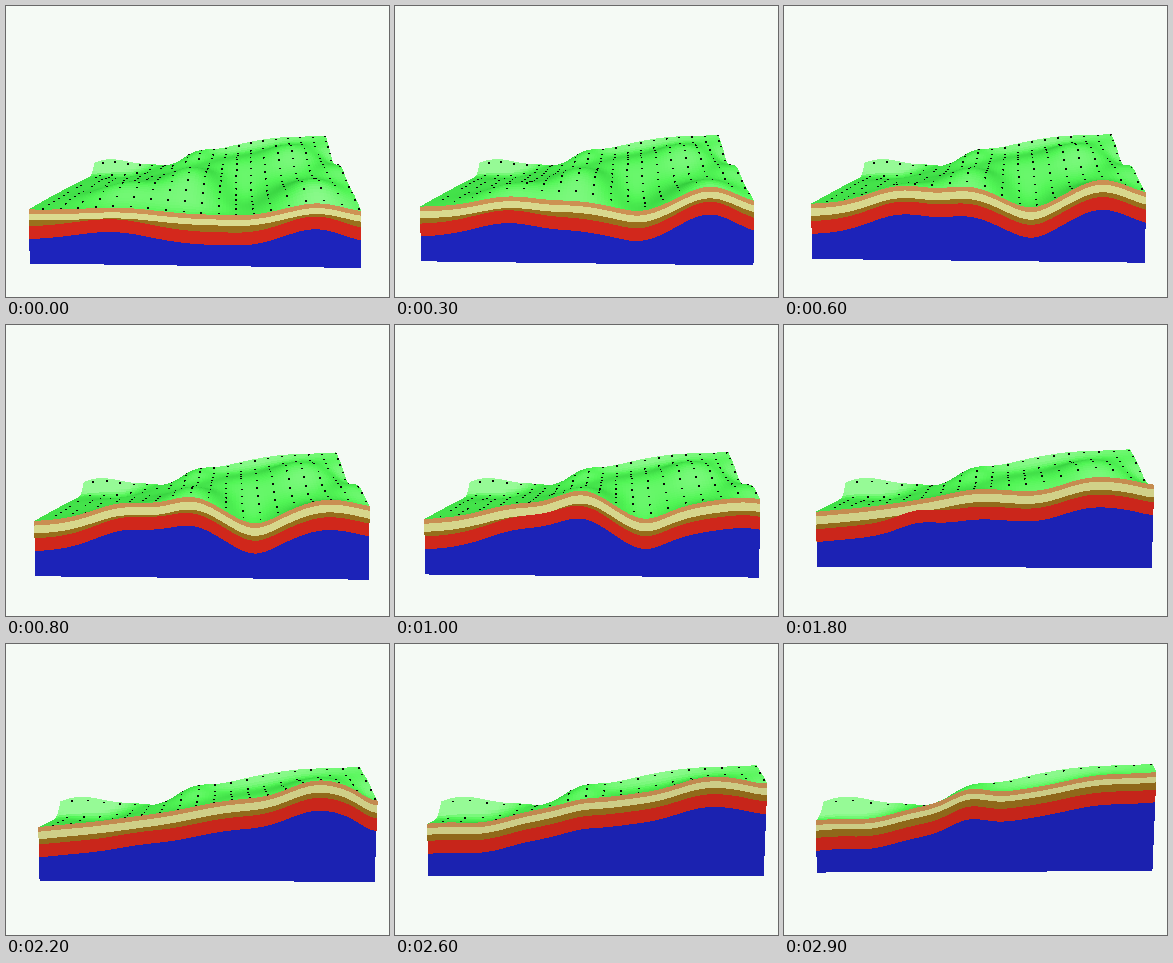
A matplotlib script for the animation above (3.2 s loop, 383x291 px).

```python
import numpy as np
import matplotlib.pyplot as plt
from matplotlib.animation import FuncAnimation
from matplotlib.collections import PolyCollection

W, H = 383, 291
FRAMES, INTERVAL = 32, 100
LAST = 29            # the cut stops here and holds
BACK = 31.65         # depth of the rear edge, in steps of the cut
STEP = 0.0139        # perspective distance per step
DEPTH = 10.5         # pixels of depth per step
WIDTH = 335
HORIZON = 155
BACK_X = 204

# Hills and hollows: height, u, v, spread in u, spread in v
HILLS = [
    (16, 0.27, 6.5, 0.13, 5),
    (20, 0.47, 10.5, 0.10, 6.5),
    (5, 0.36, 15, 0.15, 5),
    (-10, 0.66, 8.5, 0.08, 7),
    (-4, 0.50, 0, 0.13, 3),
    (20, 0.87, 4.3, 0.11, 5),
    (9, 0.97, 13, 0.08, 4),
    (17, 0.82, 22, 0.12, 6),
    (6, 0.58, 22, 0.13, 5),
    (-11, 1.00, 22, 0.06, 4),
    (-7, 0.17, 27.5, 0.10, 3.5),
    (9, 0.45, 29.5, 0.07, 3.5),
    (24, 0.05, 32.5, 0.14, 1.7),
    (-6, 0.33, 32, 0.06, 2),
    (14, 0.70, 33, 0.25, 2.5),
]
# Places where the upper layers thin out
PINCHES = [
    (6, 0.23, 0, 0.16, 4.5),
    (4.5, 0.85, 0, 0.12, 4),
    (5, 0.33, 10, 0.15, 3),
    (7, 0.30, 18, 0.08, 3),
]

PAPER = "#f5faf5"
INK = 0.03
LAYERS = np.array([[206, 146, 84], [219, 219, 143], [154, 112, 28],
                   [212, 40, 28], [29, 36, 188]]) / 255
SHADE_AT = [0.0, 0.32, 0.6, 0.85]
SHADES = np.array([[12, 100, 28], [48, 200, 58], [82, 246, 86], [150, 250, 150]]) / 255
LIGHT = np.array([0.05, 0.4, 0.92])

U = np.linspace(0, 1, 97)
DOT_U = 0.038 + 0.0533 * np.arange(19)
DOT_V = 31.4 - 2.2 * np.arange(15)


def mounds(u, v, items):
    return sum(a * np.exp(-((u - cu) / su)**2 - ((v - cv) / sv)**2)
               for a, cu, cv, su, sv in items)


def height(u, v):
    """Ground level above the horizon plane: a twisted slope with hills."""
    return -49 + 0.93 * v + u * (1.8 * v - 4) + mounds(u, v, HILLS)


def curve(n, start, slope, bend):
    return start + slope * n + bend * n * n


def sides(cut):
    return curve(cut, 23, 0.85, -0.0185), curve(cut, 355, 1.2, -0.0212)


def project(u, v, cut):
    left, right = sides(cut)
    scale = 1 + STEP * (v - cut)
    mid = (left + right) / 2
    mid = mid + (BACK_X - mid) * (v - cut) / (BACK - cut)
    return mid + (right - left) * (u - 0.5) / scale, HORIZON - height(u, v) / scale


def shade(u, v):
    du, dv = 0.005, 0.1
    side = (height(u - du, v) - height(u + du, v)) / (2 * du * WIDTH)
    toward = (height(u, v + dv) - height(u, v - dv)) / (2 * dv * DEPTH)
    lit = LIGHT[0] * side + LIGHT[1] + LIGHT[2] * toward
    lit = lit / np.sqrt(side**2 + 1 + toward**2)
    return np.stack([np.interp(lit, SHADE_AT, c) for c in SHADES.T], axis=-1)


def corners(a):
    return np.stack([a[:-1, :-1], a[:-1, 1:], a[1:, 1:], a[1:, :-1]], axis=-1)


def terrain(cut):
    """Quads and grid dots with their colours, farthest first."""
    v = np.linspace(cut, BACK, max(8, int((BACK - cut) * 1.7) + 2))
    mid_u, mid_v = (U[1:] + U[:-1]) / 2, (v[1:] + v[:-1]) / 2
    sx, sy = project(U, v[:, None], cut)
    quads = np.stack([corners(sx), corners(sy)], axis=-1).reshape(-1, 4, 2)
    colors = shade(mid_u, mid_v[:, None]).reshape(-1, 3)
    depth = np.repeat(mid_v, len(mid_u))

    dv = DOT_V[DOT_V > cut + 0.2]
    spots = np.stack(project(DOT_U, dv[:, None], cut), axis=-1).reshape(-1, 1, 2)
    dots = spots + np.array([[-1, -0.8], [1, -0.8], [1, 0.8], [-1, 0.8]])
    dot_depth = np.repeat(dv - 0.8 * (v[1] - v[0]), len(DOT_U))

    order = np.argsort(-np.concatenate([depth, dot_depth]), kind="stable")
    polys = np.concatenate([quads, dots])[order]
    tints = np.concatenate([colors, np.full((len(dots), 3), INK)])[order]
    return polys, tints


def section(cut):
    """Stacked layers of the cut face, each reaching down to the base."""
    left, right = sides(cut)
    base_l = curve(cut, 257, -0.7, -0.0103)
    base_r = curve(cut, 261.5, -0.8, -0.014)
    base = base_l + (base_r - base_l) * U
    lean = 1.3 - (1.3 + 0.14 * cut) * U

    top = HORIZON - height(U, cut)
    red = top + 17.5 - mounds(U, cut, PINCHES)
    sand = 13 - 2.5 * ((cut - 14) / 14.5)**2
    edges = [top, top + 4.7, np.minimum(top + sand, red), red, red + 12.8]

    def outline(y):
        drop = (y - top) / (base - top)
        return np.column_stack([left + (right - left) * U + drop * lean, y])

    floor = outline(base)[::-1]
    return [np.vstack([outline(e), floor]) for e in edges]


fig = plt.figure(figsize=(W / 100, H / 100), dpi=100, facecolor=PAPER)
ax = fig.add_axes([0, 0, 1, 1])
ax.set(xlim=(0, W), ylim=(H, 0))
ax.axis("off")

land = PolyCollection([], linewidths=0, antialiaseds=False, zorder=1)
wall = PolyCollection([], linewidths=0, antialiaseds=False, zorder=2)
ax.add_collection(land, autolim=False)
ax.add_collection(wall, autolim=False)


def draw(i):
    cut = min(i, LAST)
    polys, tints = terrain(cut)
    land.set_verts(polys)
    land.set_facecolor(tints)
    wall.set_verts(section(cut))
    wall.set_facecolor(LAYERS * (1 - 0.07 * cut / LAST))
    return land, wall


anim = FuncAnimation(fig, draw, frames=FRAMES, interval=INTERVAL,
                     init_func=lambda: draw(0), repeat=True, repeat_delay=0)
plt.show()
```
